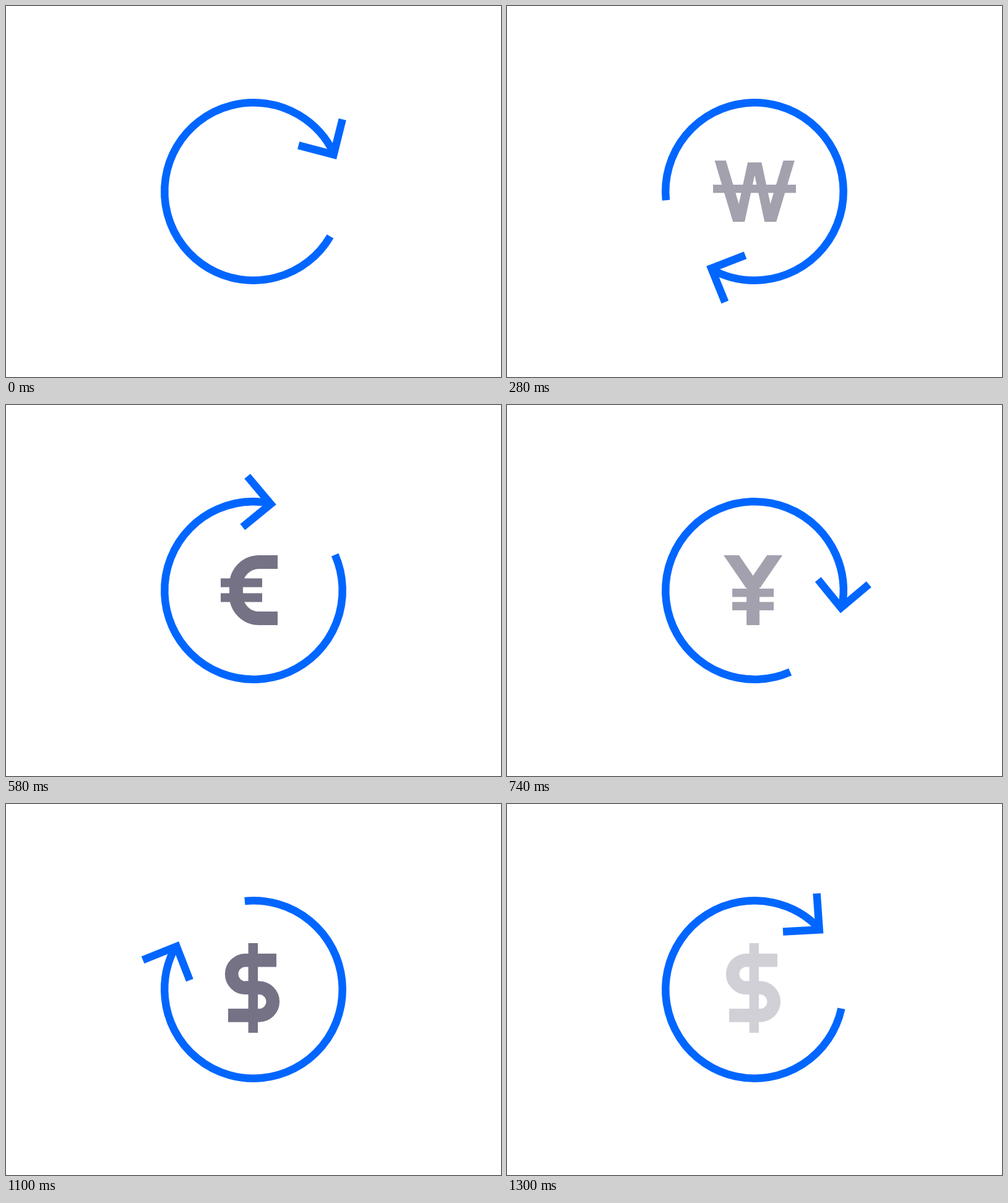
Write an HTML page with a canvas that moves like this. It is 800 px wide and 600 px high and loops after 1330 ms.

```html
<!DOCTYPE html>
<html lang="en">
<head>
<meta charset="utf-8">
<title>Currency exchange loop</title>
<style>
  html, body { margin: 0; width: 100%; height: 100%; overflow: hidden; background: #fff; }
  canvas { display: block; }
</style>
</head>
<body>
<canvas id="stage" width="800" height="600"></canvas>
<script>
const ctx = document.getElementById('stage').getContext('2d');
const LOOP = 1330;
const TURN_PER_STEP = 18;
const STEPS_PER_SIGN = 10;
const FADE_STEPS = 3;
const BLUE = '#0066ff';
const GREY = [117, 114, 134];
const LINE = 12.5;
const RADIUS = 143.75;
const rad = degrees => degrees * Math.PI / 180;

// Runs draw around (x, y), then again with the axes flipped by (sx, sy).
function mirrored(x, y, sx, sy, draw) {
  for (const flip of [false, true]) {
    ctx.save();
    ctx.translate(x, y);
    if (flip) ctx.scale(sx, sy);
    draw();
    ctx.restore();
  }
}

// Slanted bar with level ends; x values are its left edge.
function slant(x1, y1, x2, y2, width) {
  ctx.beginPath();
  ctx.moveTo(x1, y1);
  ctx.lineTo(x1 + width, y1);
  ctx.lineTo(x2 + width, y2);
  ctx.lineTo(x2, y2);
  ctx.fill();
}

function bar(centerX, centerY, width, height) {
  ctx.fillRect(centerX - width / 2, centerY - height / 2, width, height);
}

function drawWon() {
  mirrored(400.2, 349, -1, 1, () => {
    slant(-64.6, -99, -35, 0, 18.2);
    slant(-11.2, -96, -31.7, 0, 15.6);
  });
  bar(400, 295.6, 134, 13.3);
}

function drawEuro() {
  ctx.lineWidth = 22;
  mirrored(409, 299.5, 1, -1, () => {
    ctx.beginPath();
    ctx.moveTo(30, -45.5);
    ctx.arc(0, -8.5, 37, rad(270), rad(180), true);
    ctx.lineTo(-37, 1);
    ctx.stroke();
    bar(-28.5, -12, 67, 14.2);
  });
}

function drawYen() {
  mirrored(397.6, 243, -1, 1, () => slant(-47.5, 0, -11.9, 52, 24.9));
  bar(397.6, 324, 21, 64);
  bar(397.6, 303.7, 67, 13.5);
  bar(397.6, 325.3, 67, 13.5);
}

function drawDollar() {
  ctx.lineWidth = 21.6;
  mirrored(398, 297.3, -1, -1, () => {
    ctx.beginPath();
    ctx.moveTo(39, -44.6);
    ctx.arc(-11, -22.3, 22.3, rad(270), rad(90), true);
    ctx.lineTo(11, 0);
    ctx.stroke();
  });
  bar(399.3, 297.5, 15.4, 145);
}

const signs = [drawWon, drawEuro, drawYen, drawDollar];

function drawSign(step) {
  const local = step % STEPS_PER_SIGN;
  const alpha = Math.min(1, local / FADE_STEPS, (STEPS_PER_SIGN - local) / FADE_STEPS);
  if (alpha === 0) return;
  // Mixing with white keeps overlapping parts uniform.
  const mixed = GREY.map(c => Math.round(255 + (c - 255) * alpha));
  ctx.fillStyle = ctx.strokeStyle = `rgb(${mixed})`;
  signs[Math.floor(step / STEPS_PER_SIGN)]();
}

function drawArrow(degrees) {
  const spread = rad(44.6);
  const miter = LINE / 2 / Math.sin(spread);
  const arm = 65.1 - LINE / 2 / Math.tan(spread);
  const dx = miter + arm * Math.cos(spread);
  const dy = arm * Math.sin(spread);
  ctx.save();
  ctx.translate(400, 300);
  ctx.rotate(rad(degrees));
  ctx.strokeStyle = BLUE;
  ctx.lineWidth = LINE;
  ctx.beginPath();
  ctx.arc(0, 0, RADIUS, rad(30.35), rad(335.5));
  ctx.stroke();

  // Head, with its tip on the ring and its arms trailing along +x.
  ctx.rotate(rad(-21.2));
  ctx.translate(RADIUS, 0);
  ctx.rotate(rad(260.6));
  ctx.beginPath();
  ctx.moveTo(dx, dy);
  ctx.lineTo(miter, 0);
  ctx.lineTo(dx, -dy);
  ctx.stroke();
  ctx.restore();
}

// Three steps per 100 ms, held for 40, 40 and 20 ms.
function stepAt(time) {
  return Math.floor(time / 100) * 3 + Math.floor(time % 100 / 40);
}

function render(now) {
  const step = stepAt(now % LOOP);
  ctx.fillStyle = '#fff';
  ctx.fillRect(0, 0, 800, 600);
  drawSign(step);
  drawArrow(step * TURN_PER_STEP);
  requestAnimationFrame(render);
}

render(performance.now());
</script>
</body>
</html>
```
